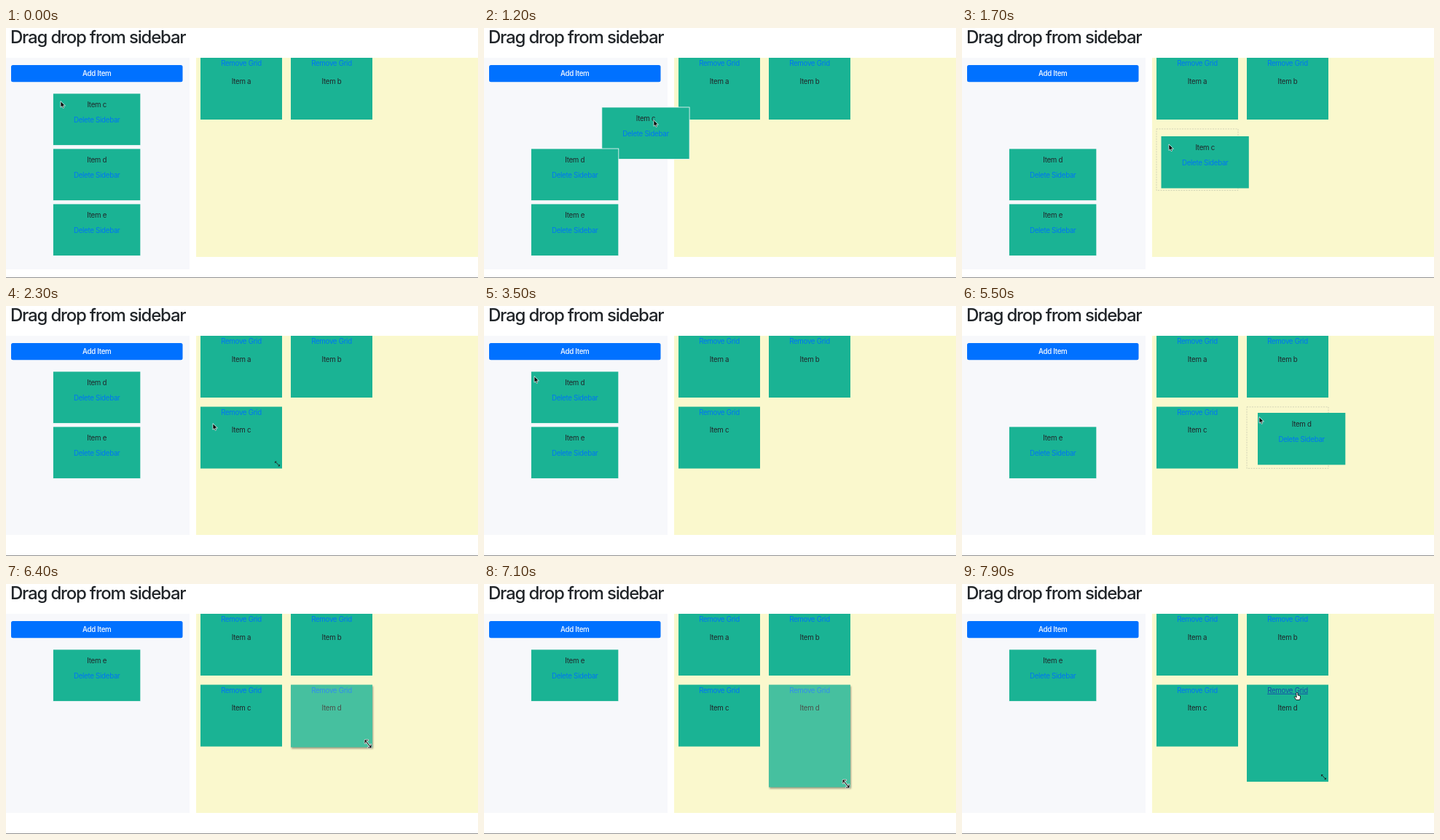
Write an HTML page that moves like this. It is 648x344 px and loops after 8000 ms.

```html
<!DOCTYPE html>
<html lang="en">
<head>
<meta charset="utf-8">
<title>Drag drop from sidebar</title>
<style>
  html, body { margin: 0; width: 100%; height: 100%; overflow: hidden; background: #fff; }
  svg { display: block; width: 648px; height: 344px; }
  text { font: 9.7px Inter, Roboto, sans-serif; letter-spacing: -.028em; text-anchor: middle; fill: #212529; }
  .title { font-size: 24px; font-weight: 500; letter-spacing: -.05em; text-anchor: start; }
  .button { font-weight: 500; fill: #fff; }
  .link { fill: #0074f5; }
  .hover .link { fill: #174ea6; text-decoration: underline; }
  .box { fill: #1ab394; }
  .card .box { stroke: #f7f8fb; stroke-width: .8; }
  .card.over .box { stroke: none; }
  .resizing { opacity: .8; filter: drop-shadow(1px 2px 1px rgba(0, 0, 0, .45)); }
  .pointer path { stroke-linejoin: round; stroke-linecap: round; }
</style>
</head>
<body>
<svg id="stage" viewBox="0 0 648 344">
  <text class="title" x="6" y="21.3">Drag drop from sidebar</text>
  <rect id="sidebar" y="41" width="252" height="291" fill="#f7f8fb"/>
  <rect x="261" y="41" width="387" height="274" fill="#faf8cd"/>
  <rect x="7" y="51" width="235.5" height="23.3" rx="2.5" fill="#0071ff"/>
  <text class="button" x="124.7" y="66.3">Add Item</text>
  <rect y="343" width="648" height="1" fill="#939393"/>
  <rect id="slot" width="112" height="84.5" fill="none" stroke="#c9c9b0" stroke-width=".8" stroke-dasharray="2 1.5"/>
  <g id="items"></g>
  <g id="cards"></g>
  <g id="arrow" class="pointer">
    <path d="M0 0V8.2L1.9 6.5L3.2 9.3L4.6 8.7L3.4 5.9H6Z" fill="#000" stroke="#fff" stroke-width=".7"/>
  </g>
  <g id="sizer" class="pointer">
    <path id="sizerPath" d="M-4 -1V-5H0M-4 -5L4 5M0 5H4V1" fill="none" stroke="#fff" stroke-width="2.4"/>
    <path d="M-4 -1V-5H0M-4 -5L4 5M0 5H4V1" fill="none" stroke="#000" stroke-width="1.1"/>
  </g>
  <g id="hand" class="pointer">
    <path d="M-1 1Q0 -.6 1 1V4L4.4 4.9Q5 7 3.7 10.5H-1.2L-3.8 6.4Q-3.2 5.2 -1 6.8Z" fill="#fff" stroke="#000" stroke-width=".8"/>
  </g>
</svg>
<script>
const LOOP = 8000, STEP = 100;
const DROP_C = 1900, DROP_D = 5800, RESIZE = 6350, RELEASE = 7200;
const $ = id => document.getElementById(id);

// Each key: time, x, y
const cursorKeys = [
  [0, 75, 101], [800, 75, 101], [1200, 233, 127], [1500, 284, 160], [2300, 284, 162],
  [2800, 284, 162], [3500, 69, 97], [4000, 69, 97], [4400, 329, 138], [4700, 408, 153],
  [5800, 408, 153], [6300, 497, 220], [6400, 497, 220], [6900, 497, 275],
  [7250, 497, 275], [7800, 460, 149]
];
const dragKeys = {
  c: [[900, 64.5, 90], [1200, 161.8, 109], [1500, 273.5, 149]],
  d: [[4050, 64.5, 90], [4400, 194.3, 113], [4800, 406, 147]]
};

function along(keys, t) {
  if (t <= keys[0][0]) return keys[0].slice(1);
  for (let i = 1; i < keys.length; i++) {
    const [t0, x0, y0] = keys[i - 1], [t1, x1, y1] = keys[i];
    if (t <= t1) {
      const p = (t - t0) / (t1 - t0), e = p * p * (3 - 2 * p);
      return [x0 + (x1 - x0) * e, y0 + (y1 - y0) * e];
    }
  }
  return keys[keys.length - 1].slice(1);
}

const show = (el, on) => { el.style.display = on ? '' : 'none'; };
const move = (el, x, y) => el.setAttribute('transform', `translate(${x} ${y})`);

function add(parent, cls, html) {
  const g = document.createElementNS('http://www.w3.org/2000/svg', 'g');
  g.setAttribute('class', cls);
  g.innerHTML = html;
  $(parent).append(g);
  return g;
}

const cards = [...'cde'].map(name => ({ name, el: add('cards', 'card', `
  <rect class="box" width="120.3" height="71.5"/>
  <text x="60.2" y="18.9">Item ${name}</text>
  <text class="link" x="60.2" y="39.6">Delete Sidebar</text>`) }));

const items = [...'abcd'].map((name, i) => {
  const x = 267 + i % 2 * 124, y = i < 2 ? 41 : 138.6;
  const el = add('items', 'item', `
    <rect class="box" width="112" height="85"/>
    <text class="link" x="56" y="11.2">Remove Grid</text>
    <text x="56" y="35.5">Item ${name}</text>
    <path class="grip" d="M-3 -1V-3H-1M-3 -3L3 3M1 3H3V1" fill="none" stroke="#222" stroke-width=".9"/>`);
  move(el, x, y);
  return { name, el, x, y, box: el.querySelector('.box'), grip: el.querySelector('.grip') };
});

function heightOfD(t, cursorY) {
  if (t < RESIZE) return 85;
  if (t < RELEASE) return 85 + Math.max(0, cursorY - 219);
  return 133.5 + 7.5 * Math.max(0, 1 - (t - RELEASE) / 200);
}

function draw(t) {
  const [cx, cy] = along(cursorKeys, t);
  const gone = (t >= DROP_C) + (t >= DROP_D);
  const dragging = t >= 900 && t < DROP_C || t >= 4000 && t < DROP_D;
  const resizing = t >= RESIZE && t < RELEASE;
  let onLink = false;

  $('sidebar').setAttribute('height', gone ? 274 : 291);

  cards.forEach(({ name, el }, i) => {
    show(el, i >= gone);
    const isDragged = dragging && i === gone;
    const [x, y] = isDragged ? along(dragKeys[name], t) : [64.5, 90 + 76 * (i - gone)];
    el.classList.toggle('over', isDragged && x > 260);
    move(el, x, y);
  });

  items.forEach((item, i) => {
    const { el, x, y, box, grip } = item;
    const visible = i < 2 + gone;
    const height = i === 3 ? heightOfD(t, cy) : 85;
    const dx = cx - x, dy = cy - y;
    const free = visible && !dragging && !resizing;
    const hover = free && dx > 0 && dx < 112 && dy > 0 && dy < height;
    const link = hover && Math.abs(dx - 56) < 28 && dy > 2 && dy < 14;
    onLink = onLink || link;
    show(el, visible);
    show(grip, hover);
    move(grip, 105.5, height - 6.5);
    box.setAttribute('height', height);
    el.classList.toggle('hover', link);
    el.classList.toggle('resizing', i === 3 && resizing);
  });

  const target = items[2 + Math.min(gone, 1)];
  show($('slot'), dragging && (t >= 1400 && t < DROP_C || t >= 4700));
  $('slot').setAttribute('x', target.x);
  $('slot').setAttribute('y', target.y + .3);

  const onGrip = t >= 6300 && t <= 7250;
  const shape = onGrip ? 'sizer' : onLink ? 'hand' : 'arrow';
  for (const id of ['arrow', 'sizer', 'hand']) show($(id), id === shape);
  move($(shape), cx, cy);
}

const start = performance.now();
function tick() {
  const t = (performance.now() - start) % LOOP;
  draw(Math.floor(t / STEP) * STEP);
  requestAnimationFrame(tick);
}
tick();
</script>
</body>
</html>
```
